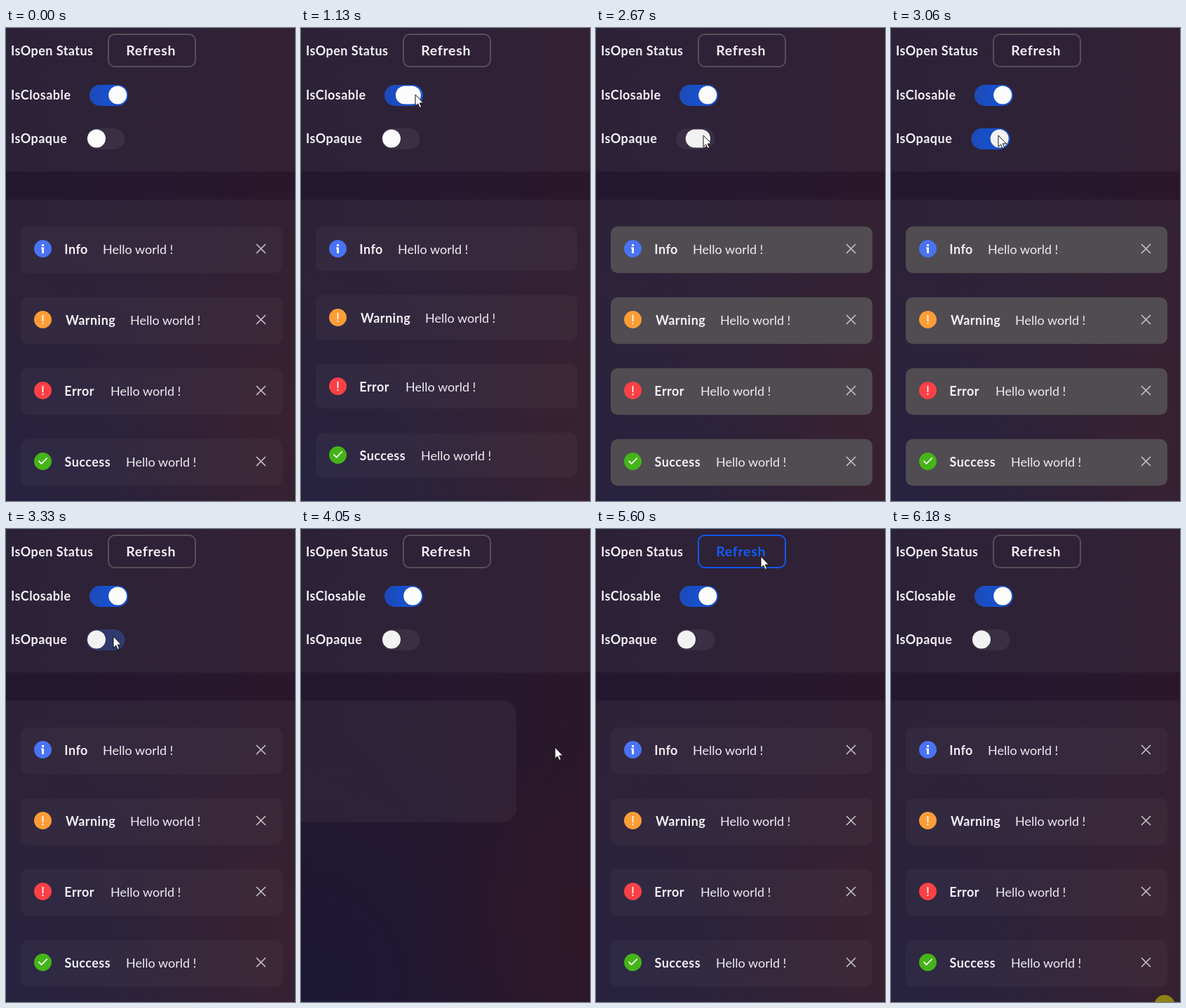
Recreate the animation shown at these times as an HTML page. Size 412x674 px, loop 6250 ms.

```html
<!DOCTYPE html>
<html lang="en">
<head>
<meta charset="utf-8">
<title>Info bar demo</title>
<style>
  html, body { margin: 0; width: 100%; height: 100%; overflow: hidden; background: #25182f; }
  svg { display: block; width: 100vw; height: 100vh; }
  text { font: 18px Lato, "Open Sans", sans-serif; fill: #eeebf0; }
  .b { font-weight: 700; letter-spacing: .45px; fill: #f2f0f4; }
  .btn { font-size: 19.5px; letter-spacing: .7px; }
  .line { fill: none; stroke: #fff; stroke-width: 1.7; stroke-linecap: round; stroke-linejoin: round; }
</style>
</head>
<body>
<svg id="stage" viewBox="0 0 412 674" xmlns="http://www.w3.org/2000/svg"></svg>
<script>
const LOOP = 6250;
const stage = document.getElementById('stage');

const bars = [
  { title: 'Info', titleX: 83.3, msgX: 138, color: '#4a73f3',
    glyph: '<path d="M-1.4-6.5h2.9v2.9h-2.9zM-2.4-2h3.9V6.5h-2.9V0h-1z" fill="#fff"/>' },
  { title: 'Warning', titleX: 85, msgX: 177, color: '#fd9d37', glyph: bang() },
  { title: 'Error', titleX: 83.3, msgX: 149, color: '#fb4146', glyph: bang() },
  { title: 'Success', titleX: 83.6, msgX: 171, color: '#45b418',
    glyph: '<path class="line" d="M-5.5-.3L-2 3.3 5.8-4.5"/>' }
];

function bang() {
  return '<path class="line" d="M0-6V2"/><circle cy="5.6" r="1.1" fill="#fff"/>';
}

function barMarkup({ title, titleX, msgX, color, glyph }) {
  return `<g class="bar">
    <rect class="card" x="21" width="373" rx="10"/>
    <g transform="translate(52.5 31.7)"><circle r="12.5" fill="${color}"/>${glyph}</g>
    <text class="b" x="${titleX}" y="39">${title}</text>
    <text x="${msgX}" y="39">Hello world !</text>
    <path class="close" d="M357.5 25.7l12 12m0-12l-12 12" fill="none" stroke="#c4c0c8" stroke-width="1.7" stroke-linecap="round"/>
  </g>`;
}

function switchMarkup(id, x, y) {
  return `<g id="${id}" transform="translate(${x} ${y})">
    <rect width="55" height="30" rx="15" fill="#fff" fill-opacity=".06"/>
    <rect class="on" width="55" height="30" rx="15" fill="url(#blue)"/>
    <rect class="shade" y=".8" height="28" rx="14" fill="#150d1c" fill-opacity=".12"/>
    <rect class="knob" y="1.4" height="26.2" rx="13.1" fill="#fcfcfc"/>
  </g>`;
}

stage.innerHTML = `
  <defs>
    <linearGradient id="base"><stop stop-color="#23182f"/><stop offset=".55" stop-color="#26182e"/><stop offset="1" stop-color="#2a1729"/></linearGradient>
    <radialGradient id="navy" gradientUnits="userSpaceOnUse" cx="10" cy="640" r="360">
      <stop stop-color="#1d1836"/><stop offset=".3" stop-color="#1e1835" stop-opacity=".8"/><stop offset="1" stop-color="#201832" stop-opacity="0"/>
    </radialGradient>
    <radialGradient id="wine" gradientUnits="userSpaceOnUse" cx="430" cy="560" r="280">
      <stop stop-color="#301727"/><stop offset="1" stop-color="#2d1728" stop-opacity="0"/>
    </radialGradient>
    <linearGradient id="blue"><stop stop-color="#1d4ab6"/><stop offset="1" stop-color="#1257e4"/></linearGradient>
  </defs>
  <rect width="412" height="674" fill="url(#base)"/>
  <rect width="412" height="674" fill="url(#navy)"/>
  <rect width="412" height="674" fill="url(#wine)"/>
  <rect width="412" height="204.5" fill="#fff" fill-opacity=".045"/>
  <rect id="panel" x="-40" y="244.5" rx="20" fill="#fff" fill-opacity=".045"/>
  <text class="b" x="7" y="39">IsOpen Status</text>
  <text class="b" x="7" y="102">IsClosable</text>
  <text class="b" x="7" y="164">IsOpaque</text>
  <rect id="frame" x="146" y="9" width="124" height="46" rx="9" fill="none" stroke-width="2"/>
  <text id="refresh" class="b btn" x="171.2" y="39">Refresh</text>
  ${switchMarkup('closable', 119, 81)}
  ${switchMarkup('opaque', 114.5, 143)}
  <g id="list">${bars.map(barMarkup).join('')}</g>
  <circle id="spot" cx="390" cy="679" r="15" fill="#8f8116"/>
  <path id="cursor" d="M0 0V16.3L3.7 12.9 6.1 18.5 8.7 17.4 6.3 11.9H11.4Z" fill="#fff" stroke="#111" stroke-width="1"/>`;

const $ = id => document.getElementById(id);
const set = (el, attrs) => { for (const k in attrs) el.setAttribute(k, attrs[k]); };
const mix = (a, b, p) => a + (b - a) * p;
const rgb = (a, b, p) => `rgb(${a.map((v, i) => Math.round(mix(v, b[i], p)))})`;
const linear = p => p;
const smooth = p => (1 - Math.cos(Math.PI * p)) / 2;
const easeOut = p => 1 - (1 - p) ** 3;
const ramp = (t, start, length, ease = linear) =>
  ease(Math.min(1, Math.max(0, (t - start) / length)));

// Cursor legs: start, length, from, to
const legs = [
  [460, 530, [398, 653], [163, 95]],
  [1950, 250, [163, 95], [153, 153]],
  [3400, 270, [153, 153], [362, 311]],
  [4220, 540, [362, 311], [235, 39]],
  [5600, 420, [235, 39], [391, 676]]
];

function cursorAt(t) {
  let pos = legs[0][2];
  for (const [start, length, from, to] of legs) {
    if (t < start) break;
    const p = ramp(t, start, length, smooth);
    pos = from.map((v, i) => mix(v, to[i], p));
  }
  return pos;
}

// Switch clicks: press, release, new value
const clicks = {
  closable: [[1010, 1090, 0], [1600, 1690, 1]],
  opaque: [[2430, 2530, 1], [3060, 3085, 0]]
};

function drawSwitch(id, t) {
  let value = 1 - clicks[id][0][2];
  let slide = value, glow = value, held = 0;
  for (const [press, release, next] of clicks[id]) {
    if (t < press) break;
    held = ramp(t, press, 60, smooth) - ramp(t, release + 120, 120, smooth);
    slide = mix(value, next, ramp(t, release, 220, smooth));
    glow = mix(value, next, ramp(t, release + 140, 150));
    if (t >= release) value = next;
  }
  const width = 26 + 10 * Math.max(0, held);
  const x = mix(1.5, 53.2 - width, slide);
  const g = $(id);
  set(g.querySelector('.on'), { opacity: glow });
  set(g.querySelector('.shade'), { x: x - 1, width: width + 2 });
  set(g.querySelector('.knob'), { x, width });
  return value;
}

function drawBars(t, closable, opaque) {
  const step = closable ? 101 : 98;
  const shown = t < 4850 ? 1 - ramp(t, 3690, 350, easeOut) : ramp(t, 4850, 485, easeOut);
  set($('list'), { opacity: shown });
  document.querySelectorAll('.bar').forEach((bar, i) => {
    set(bar, { transform: `translate(0 ${282.8 + step * i})` });
    set(bar.querySelector('.card'), {
      height: closable ? 66.4 : 63.4,
      fill: opaque > 0 ? '#504c51' : '#fff',
      'fill-opacity': mix(.03, 1, opaque)
    });
    set(bar.querySelector('.close'), { visibility: closable ? 'visible' : 'hidden' });
  });
  const open = t < 4850 ? 1 - ramp(t, 3700, 340, easeOut) : ramp(t, 4850, 338, easeOut);
  set($('panel'), { width: mix(347, 474, open), height: mix(173.5, 465, open) });
}

function draw(t) {
  const [x, y] = cursorAt(t);
  set($('cursor'), {
    transform: `translate(${x} ${y})`,
    visibility: t >= 460 && t < 6020 ? 'visible' : 'hidden'
  });
  set($('spot'), { visibility: t >= 6180 ? 'visible' : 'hidden' });

  const hover = ramp(t, 4600, 120) - ramp(t, 5660, 150);
  set($('frame'), { stroke: rgb([86, 80, 86], [16, 88, 240], hover) });
  $('refresh').style.fill = rgb([242, 240, 244], [16, 92, 248], hover);

  const closable = drawSwitch('closable', t);
  drawSwitch('opaque', t);
  set($('opaque').querySelector('.knob'), { fill: t < 2640 ? '#fcfcfc' : '#f3f2f2' });
  drawBars(t, closable, ramp(t, 2530, 120) - ramp(t, 3085, 150));
}

function tick() {
  draw(performance.now() % LOOP);
  requestAnimationFrame(tick);
}
tick();
</script>
</body>
</html>
```
